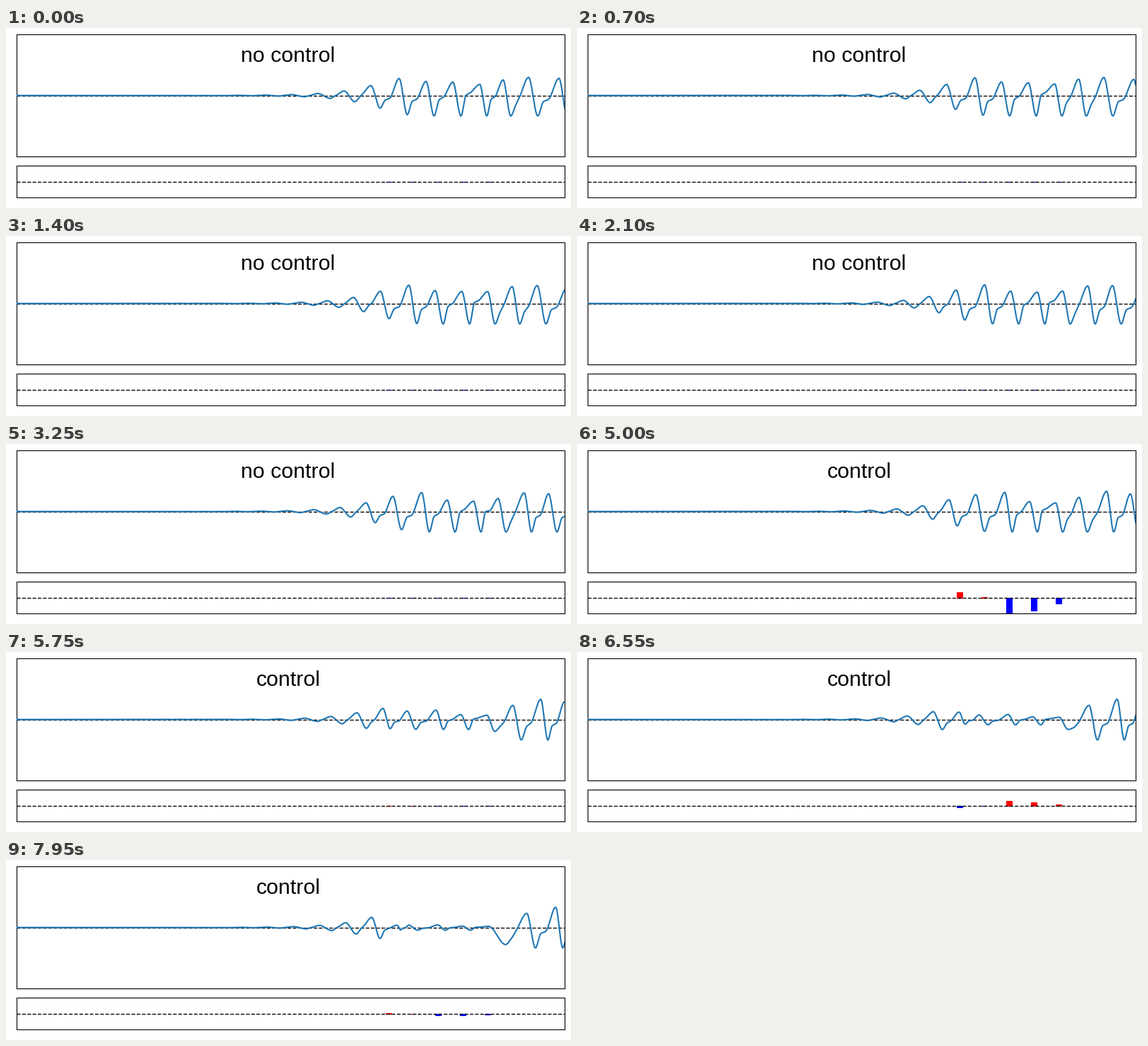
Animation of 799 by 255 pixels, one loop 8 s. Source, as a matplotlib script:

```python
import numpy as np
import matplotlib.pyplot as plt
from matplotlib.animation import FuncAnimation
from matplotlib.patches import Rectangle

W, H, DPI = 799, 255, 100
FRAMES, STEP = 160, 50
LEFT, RIGHT = 15.1, 790.1
REST = 95.6         # height of the undisturbed film
SPEED = 9.6         # px per second
CONTROL_AT = 5.0    # seconds

# Crest positions and relative strengths, at the start and when control begins
CREST_X = np.array([[478, 516, 556, 594, 632, 670, 703, 739, 782, 820],
                    [526, 564, 605, 640, 677, 710, 749, 782.5, 820, 858]])
STRENGTH = np.array([[1, 1, 1, .74, .7, .58, .82, .95, .9, 0],
                     [1, .95, 1, .52, .45, .74, 1.06, .92, .5, 0]])
RIPPLES, RIPPLE_GAP = 8, 37

JET_X = 540.5 + 35.2 * np.arange(5)
FIRST_PUSH = np.array([8, 1, -24, -18, -8])


def ramp(x, start, end):
    u = np.clip((x - start) / (end - start), 0, 1)
    return u * u * (3 - 2 * u)


def zone(x):
    """1 where the jets act on the film, 0 elsewhere."""
    return ramp(x, 522, 552) * (1 - ramp(x, 682, 716))


def swell(x, top):
    """Wave size: exponential growth downstream that levels off at top."""
    return top * np.tanh(6.5 * np.exp((x - 478) / 44) / top)


def crests(t):
    u = min(t / CONTROL_AT, 1)
    x = CREST_X[0] * (1 - u) + CREST_X[1] * u
    strength = STRENGTH[0] * (1 - u) + STRENGTH[1] * u
    x = np.append(x[0] - RIPPLE_GAP * np.arange(RIPPLES, 0, -1), x)
    strength = np.append(np.ones(RIPPLES), strength)
    held = max(t - CONTROL_AT, 0)
    free, stalled = SPEED * held, 6 * (1 - np.exp(-held))
    return x + free + (stalled - free) * zone(x), strength


def knots(t):
    """Crest, trough and two shoulder points for each wave."""
    x, strength = crests(t)
    y = REST - strength * swell(x, 27)
    x0, x1, y0, y1 = x[:-1], x[1:], y[:-1], y[1:]

    lag = 0.3 + 0.3 * np.clip((530 - x0) / 150, 0, 0.65)
    tx = np.maximum(x0 + lag * (x1 - x0), x1 - 30)
    ty = REST + swell(tx, 29)

    pts = [(x0, y0), (tx, ty)]
    for part, lift in ((0.27, 1.5), (0.5, -1.5)):
        sx = tx + part * (x1 - tx)
        level = REST + lift + 0.25 * swell(sx, 29) - 10 * np.exp(-((sx - 665) / 45) ** 2)
        line = ty + part * (y1 - ty)
        steady = np.maximum(np.exp(-((sx - 712) / 25) ** 4), 1 - ramp(sx, 505, 535))
        pts.append((sx, level + (line - level) * steady))

    px, py = np.array(pts).transpose(1, 2, 0).reshape(2, -1)
    calm = 0.9 * (1 - np.exp(-max(t - CONTROL_AT, 0) / 0.9))
    py = REST + (py - REST) * (1 - calm * zone(px))
    return np.append([0, 150], px), np.append([REST, REST], py)


def smooth(px, py, x):
    """Monotone cubic through the points, level at each extremum."""
    h = np.diff(px)
    d = np.diff(py) / h
    a, b = d[:-1], d[1:]
    w1, w2 = 2 * h[1:] + h[:-1], h[1:] + 2 * h[:-1]
    same = a * b > 0
    sa, sb = np.where(same, a, 1), np.where(same, b, 1)
    m = np.zeros_like(px)
    m[1:-1] = np.where(same, (w1 + w2) / (w1 / sa + w2 / sb), 0)
    i = np.clip(np.searchsorted(px, x) - 1, 0, len(h) - 1)
    s = (x - px[i]) / h[i]
    return (py[i] * (1 + 2 * s) * (1 - s) ** 2 + m[i] * h[i] * s * (1 - s) ** 2
            + py[i + 1] * s * s * (3 - 2 * s) - m[i + 1] * h[i] * s * s * (1 - s))


def pushes(t):
    """Jet forces: a strong first push that swings and dies away."""
    held = t - CONTROL_AT
    if held < 0:
        return np.zeros(len(JET_X))
    return FIRST_PUSH * np.exp(-0.8 * held) * np.cos(np.pi * held / 1.5)


def panel(top, bottom, middle):
    """Framed axes measured in stage pixels, y pointing down."""
    ax = fig.add_axes([LEFT / W, 1 - bottom / H, (RIGHT - LEFT) / W, (bottom - top) / H])
    ax.set(xlim=(LEFT, RIGHT), ylim=(bottom, top), xticks=[], yticks=[])
    ax.plot([LEFT, RIGHT], [middle, middle], "k--", lw=1, zorder=2)
    return ax


fig = plt.figure(figsize=(W / DPI + 1e-5, H / DPI + 1e-5), dpi=DPI, facecolor="white")
film = panel(9, 182, 96)
jets = panel(195, 240, 218)

xs = np.arange(LEFT, RIGHT + 0.5, 0.5)
wave, = film.plot(xs, np.full_like(xs, REST), color="#1f77b4", lw=1.5, zorder=3)
title = fig.text(399 / W, 1 - 48 / H, "", ha="center", va="baseline",
                 family="Liberation Sans", size=21.9)
bars = [jets.add_patch(Rectangle((x - 4, 218), 8, 0, lw=0.8, zorder=1)) for x in JET_X]


def draw(n):
    t = n * STEP / 1000
    wave.set_ydata(smooth(*knots(t), xs))
    title.set_text("control" if t >= CONTROL_AT else "no control")
    for bar, push in zip(bars, pushes(t)):
        bar.set_height(-push)
        bar.set_color("red" if push > 0 else "blue")
    return [wave, title, *bars]


anim = FuncAnimation(fig, draw, frames=FRAMES, interval=STEP, repeat=True, repeat_delay=0)
plt.show()
```
